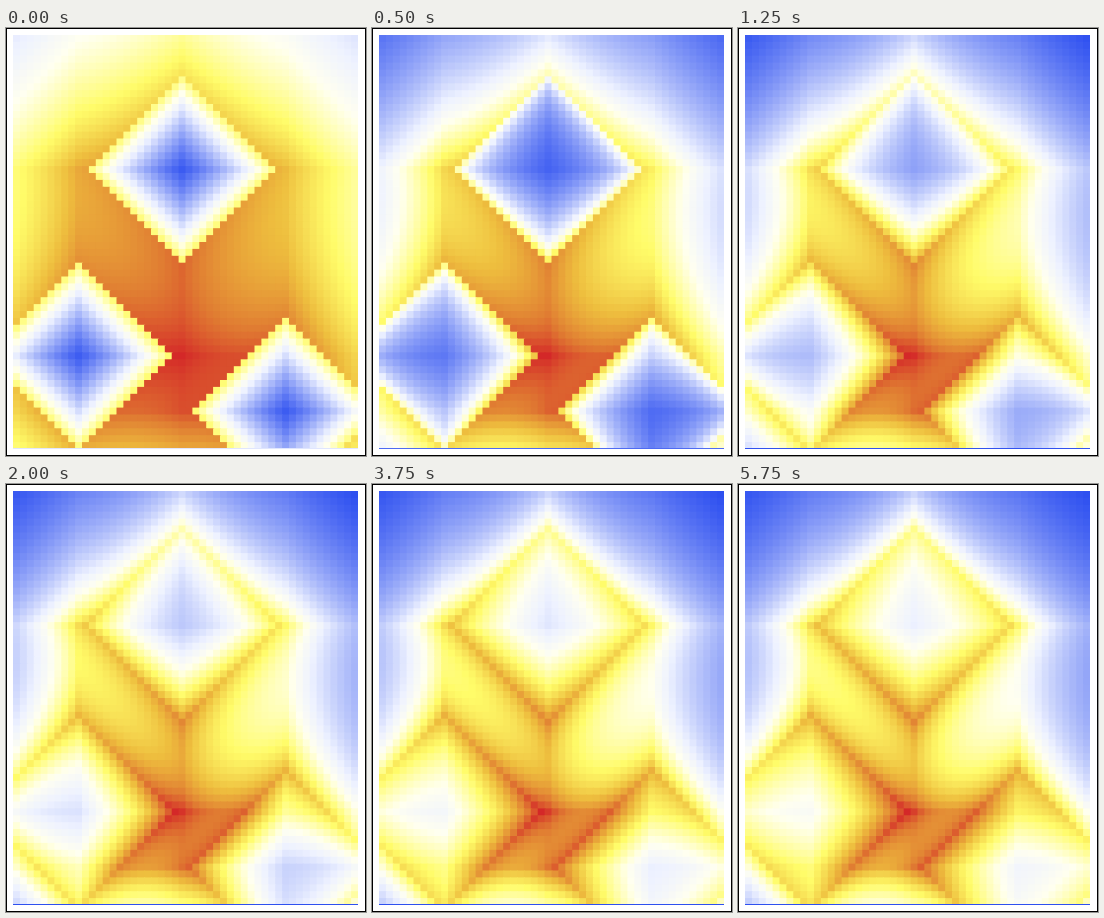
An HTML page with a canvas for the animation above (6000 ms loop, 360 by 428 pixels).

```html
<!DOCTYPE html>
<html lang="en">
<head>
<meta charset="utf-8">
<title>Heat field</title>
<style>
  html, body { margin: 0; width: 100%; height: 100%; overflow: hidden; background: #fff; }
  canvas { display: block; width: 360px; height: 428px; }
</style>
</head>
<body>
<canvas id="stage" width="360" height="428"></canvas>
<script>
const COLS = 50, ROWS = 60, CELL = 6.9, LEFT = 7, TOP = 7;
const RIGHT = LEFT + COLS * CELL, BOTTOM = TOP + ROWS * CELL;
const RADIUS = 14, STEP_MS = 250, STEPS = 24;
const sources = [[24, 19], [9, 46], [39, 54]];
const palette = [
  [0, 46, 80, 240],
  [0.4, 238, 242, 255],
  [0.48, 255, 255, 240],
  [0.63, 255, 252, 105],
  [0.76, 238, 190, 62],
  [0.88, 224, 124, 50],
  [1, 212, 40, 40]
];
const ctx = document.getElementById('stage').getContext('2d');
const mix = (a, b, t) => a + (b - a) * t;

function color(value) {
  const v = Math.min(1, Math.max(0, value));
  const i = Math.max(1, palette.findIndex(stop => stop[0] >= v));
  const a = palette[i - 1], b = palette[i];
  const t = (v - a[0]) / (b[0] - a[0]);
  const [r, g, bl] = [1, 2, 3].map(k => Math.round(mix(a[k], b[k], t)));
  return `rgb(${r},${g},${bl})`;
}

const cells = [];
for (let row = 0; row < ROWS; row++) {
  for (let col = 0; col < COLS; col++) {
    const dist = sources.map(([x, y]) => Math.abs(col - x) + Math.abs(row - y));
    const x = LEFT + col * CELL, y = TOP + row * CELL;
    cells.push({
      x, y, dist,
      // overlap the next cell so that soft edges leave no seams
      w: Math.min(CELL + 1, RIGHT - x),
      h: Math.min(CELL + 1, BOTTOM - y),
      near: Math.min(...dist)
    });
  }
}

function draw(step) {
  const softness = 10 + 22 * Math.exp(-step / 5);
  const steepness = 0.4 + 40 / (step * step + 0.5);
  const floor = 0.37 * Math.exp(-step * 0.85);
  const repulsion = 0.9 * Math.exp(-step * 0.6);

  // pull is strongest on the rim of each diamond and falls off on both sides
  const gap = d => d < RADIUS ? (RADIUS - d) * steepness : d - RADIUS;
  const pull = cells.map(c => c.dist.reduce((sum, d) => sum + 1 / (softness + gap(d)), 0));
  const outer = pull.filter((_, i) => cells[i].near >= RADIUS);
  const low = Math.min(...outer), high = Math.max(...outer);

  ctx.fillStyle = '#000';
  ctx.fillRect(0, 0, 360, 428);
  ctx.fillStyle = '#fff';
  ctx.fillRect(1, 1, 358, 426);

  cells.forEach((c, i) => {
    let v = mix(floor, 1, (pull[i] - low) / (high - low));
    if (c.near < RADIUS) {
      v = mix(v, 0.62 * Math.pow(c.near / (RADIUS - 1), 1.2), repulsion);
    }
    ctx.fillStyle = color(v);
    ctx.fillRect(c.x, c.y, c.w, c.h);
  });

  ctx.fillStyle = color(floor);
  ctx.fillRect(LEFT, 420, 345, 1);
}

let shown = -1;
function tick() {
  const step = Math.floor(performance.now() / STEP_MS) % STEPS;
  if (step !== shown) draw(shown = step);
  requestAnimationFrame(tick);
}
tick();
</script>
</body>
</html>
```
